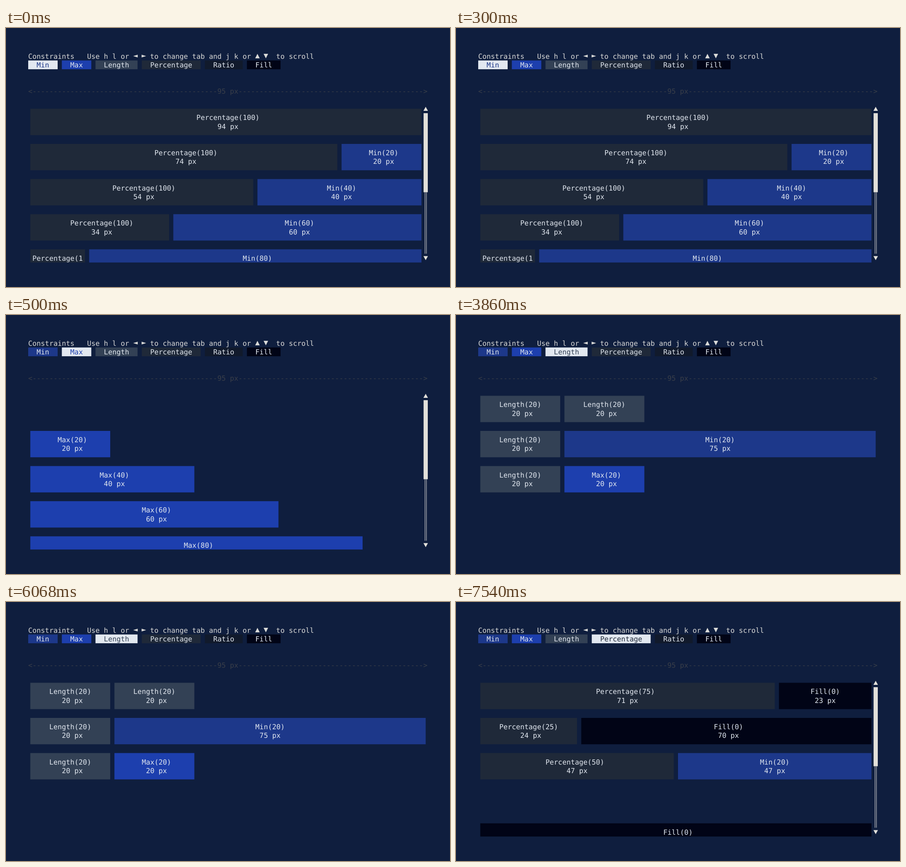
An HTML page that plays this animation: 980 by 572 pixels, repeating every 8 s.

```html
<!DOCTYPE html>
<html lang="en">
<head>
<meta charset="utf-8">
<title>Constraints</title>
<style>
  html, body { margin: 0; width: 100%; height: 100%; overflow: hidden; background: #0f1e3e; }
  svg { display: block; width: 980px; height: 572px; }
  text {
    font: 15.42px "DejaVu Sans Mono", "Noto Sans Mono", monospace;
    white-space: pre;
    text-rendering: geometricPrecision;
  }
</style>
</head>
<body>
<svg id="stage" viewBox="0 0 980 572"></svg>
<script>
const LEFT = 49, TOP = 52.3, CW = 9.284, RH = 19.4;
const ROWS = 24, COLS = 95, LOOP = 8000;
const LIGHT = '#e2e8f0', HEAD = '#dadad8', BAR = '#e2e0da', DIM = '#3a3f49';
const COLORS = {
  Min: '#1d388a', Max: '#1d3fae', Length: '#334155',
  Percentage: '#1f2939', Ratio: '#111a2c', Fill: '#010416'
};

// Each block is [constraint, width in cells]; null is an empty row.
const SCENES = [
  { start: 0, tab: 'Min', scroll: true, rows: [
    [['Percentage(100)', 94]],
    [['Percentage(100)', 74], ['Min(20)', 20]],
    [['Percentage(100)', 54], ['Min(40)', 40]],
    [['Percentage(100)', 34], ['Min(60)', 60]],
    [['Percentage(100)', 14], ['Min(80)', 80]]
  ] },
  { start: 500, tab: 'Max', scroll: true, rows: [
    null, [['Max(20)', 20]], [['Max(40)', 40]], [['Max(60)', 60]], [['Max(80)', 80]]
  ] },
  { start: 3860, tab: 'Length', scroll: false, rows: [
    [['Length(20)', 20], ['Length(20)', 20]],
    [['Length(20)', 20], ['Min(20)', 75]],
    [['Length(20)', 20], ['Max(20)', 20]]
  ] },
  { start: 7540, tab: 'Percentage', scroll: true, rows: [
    [['Percentage(75)', 71], ['Fill(0)', 23]],
    [['Percentage(25)', 24], ['Fill(0)', 70]],
    [['Percentage(50)', 47], ['Min(20)', 47]],
    null,
    [['Fill(0)', 94]]
  ] }
];

const px = col => LEFT + col * CW;
const py = row => TOP + row * RH;

const box = (x, y, w, h, fill) =>
  `<rect x="${x}" y="${y}" width="${w}" height="${h}" fill="${fill}"/>`;

const cells = (col, row, w, h, fill) => box(px(col), py(row), w * CW, h * RH, fill);

const label = (col, row, str, fill, weight = 400) =>
  `<text x="${px(col)}" y="${py(row) + 15.3}" fill="${fill}" font-weight="${weight}">` +
  str.replace(/</g, '&lt;') + '</text>';

function arrow(col, row, angle, length, half, fill) {
  const l = length / 2;
  return `<path d="M0 ${-l}L${half} ${l}H${-half}Z" fill="${fill}" ` +
    `transform="translate(${px(col + .5)} ${py(row + .5)}) rotate(${angle})"/>`;
}

function header() {
  const dashes = '-'.repeat(44);
  return label(0, 0, 'Constraints', HEAD, 700) +
    label(14, 0, 'Use h l or     to change tab and j k or      to scroll', HEAD) +
    arrow(25, 0, -90, 10, 3, HEAD) + arrow(27, 0, 90, 10, 3, HEAD) +
    arrow(54, 0, 0, 10, 5, HEAD) + arrow(56, 0, 180, 10, 5, HEAD) +
    label(0, 4, `<${dashes}95 px${dashes}>`, DIM);
}

function tabs(selected) {
  let col = 0, out = '';
  for (const [name, color] of Object.entries(COLORS)) {
    const on = name === selected, w = name.length + 4;
    out += cells(col, 1, w, 1, on ? LIGHT : color) +
      label(col + 2, 1, name, on ? color : LIGHT);
    col += w + 1;
  }
  return out;
}

function centered(col, row, width, str) {
  const inner = width - 2, shown = str.slice(0, inner);
  const pad = Math.floor(inner / 2) - Math.floor(shown.length / 2);
  return label(col + 1 + pad, row, shown, LIGHT);
}

function block(col, row, width, name) {
  const top = row + .5, h = Math.min(3, ROWS - top);
  let out = cells(col + .5, top, width - 1, h, COLORS[name.split('(')[0]]) +
    centered(col, row + 1, width, name);
  if (row + 2 < ROWS) out += centered(col, row + 2, width, `${width} px`);
  return out;
}

function blocks(rows) {
  return rows.map((row, i) => {
    let col = 0;
    return (row || []).map(([name, width]) => {
      const out = block(col, 6 + i * 4, width, name);
      col += width;
      return out;
    }).join('');
  }).join('');
}

function scrollbar() {
  const col = COLS - 1, x = px(col), y = py(16), h = 7 * RH;
  return arrow(col, 6, 0, 9, 5, BAR) + cells(col, 7, 1, 9, BAR) +
    box(x + 2.6, y, 1, h, BAR) + box(x + 5.8, y, 1, h, BAR) +
    arrow(col, 23, 180, 9, 5, BAR);
}

const stage = document.getElementById('stage');
const views = SCENES.map(s =>
  header() + tabs(s.tab) + blocks(s.rows) + (s.scroll ? scrollbar() : ''));
let current = -1, origin;

function draw(ms) {
  const i = SCENES.findLastIndex(s => s.start <= ms);
  if (i !== current) stage.innerHTML = views[current = i];
}

function tick(now) {
  origin ??= now;
  draw((now - origin) % LOOP);
  requestAnimationFrame(tick);
}

draw(0);
requestAnimationFrame(tick);
</script>
</body>
</html>
```
